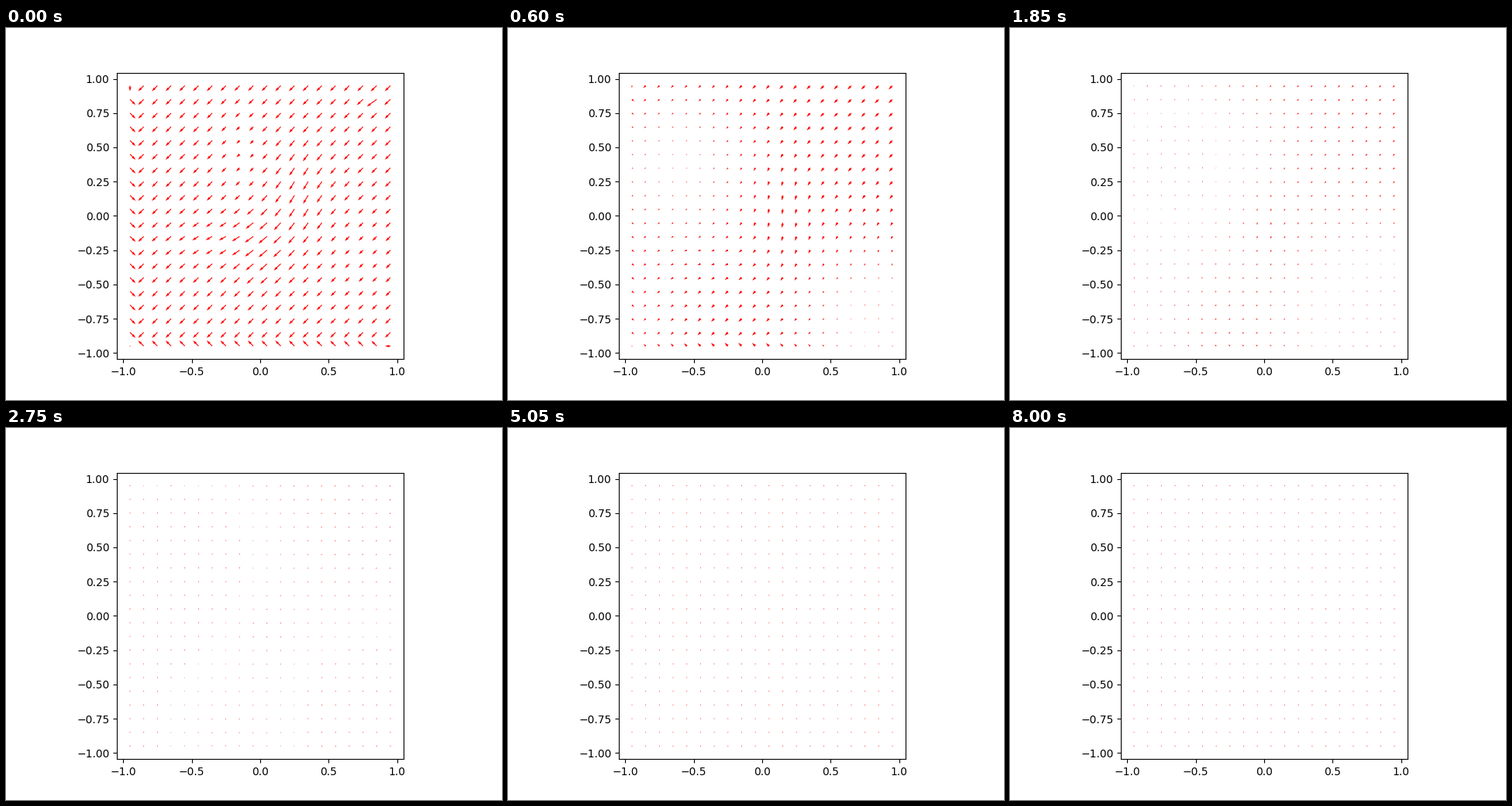
Recreate the animation shown at these times as a matplotlib script. Size 640 px wide and 480 px high, loop 8050 ms.

```python
import numpy as np
import matplotlib.pyplot as plt
from matplotlib.animation import FuncAnimation

FRAMES, STEP = 161, 50
WIND = 7.2      # opening speed per component, in pixels
DECAY = 0.6     # loss of speed per second

axis = np.linspace(-0.95, 0.95, 20)
X, Y = np.meshgrid(axis, axis)


def blob(x, y, w, h):
    return np.exp(-((X - x) / w) ** 2 / 2 - ((Y - y) / h) ** 2 / 2)


def mix(a, b, s):
    return a + (b - a) * s


def calm(s, sx=0, sy=0):
    """Share of the wind left by three slack regions that widen with s."""
    left = mix(0.45, 0.8, s) * blob(
        mix(-0.12, -0.6, s) + sx, mix(0.48, 0.38, s),
        mix(0.11, 0.5, s), mix(0.22, 0.52, s))
    right = mix(0.25, 1, s) * blob(
        mix(0.75, 0.9, s), mix(-0.3, -0.62, s) + sy,
        mix(0.2, 0.5, s), mix(0.3, 0.45, s))
    corner = 0.5 * s * blob(-1, -0.9, 0.4, 0.5)
    return (1 - left) * (1 - right) * (1 - corner)


def bounce(f):
    """Reflect the flow off the left and bottom walls."""
    u, v = f
    u[:, 0], v[:, 0] = -u[:, 1], v[:, 1]
    u[0], v[0] = u[1], -v[1]
    for j, i, nj, ni in ((0, 0, 1, 1), (0, -1, 1, -2), (-1, 0, -2, 1)):
        f[:, j, i] = (f[:, j, ni] + f[:, nj, i]) / 2
    return f


def flow(t):
    s = 1 - np.exp(-t / 0.2)
    drift = 1 - np.exp(-t / 0.9)
    u = -WIND * calm(s)
    v = -WIND * calm(s, -0.1 * s, -0.28 * s)

    # A jet bends down on its right flank and left on its lower one
    down = blob(mix(0.31, -0.02, drift), mix(0.17, -0.1, drift), 0.15, 0.25)
    side = blob(mix(-0.28, -0.45, drift), mix(-0.16, -0.45, drift), 0.25, 0.13)
    core = blob(0.02, -0.2, 0.15, 0.19) * (1 - s)
    gust = blob(0.85, 0.85, 0.05, 0.05) * (1 - s)
    u += mix(0.6, 4, s) * down - 1.2 * side - 3.6 * core - 5.5 * gust
    v += -4 * down + 2.6 * side - 2.8 * core - 2 * gust
    return bounce(np.array([u, v])) * np.exp(-DECAY * t)


fig, ax = plt.subplots(figsize=(6.4, 4.8), dpi=100)
ax.set_aspect("equal")
ax.set(xlim=(-1.045, 1.045), ylim=(-1.045, 1.045),
       xticks=np.arange(-1, 1.1, 0.5), yticks=np.arange(-1, 1.1, 0.25))
arrows = ax.quiver(X, Y, *flow(0), color="r", width=0.003,
                   scale=1, scale_units="dots")


def update(n):
    arrows.set_UVC(*flow(n * STEP / 1000))
    return arrows,


anim = FuncAnimation(fig, update, frames=FRAMES, interval=STEP,
                     repeat=True, repeat_delay=0)
plt.show()
```
